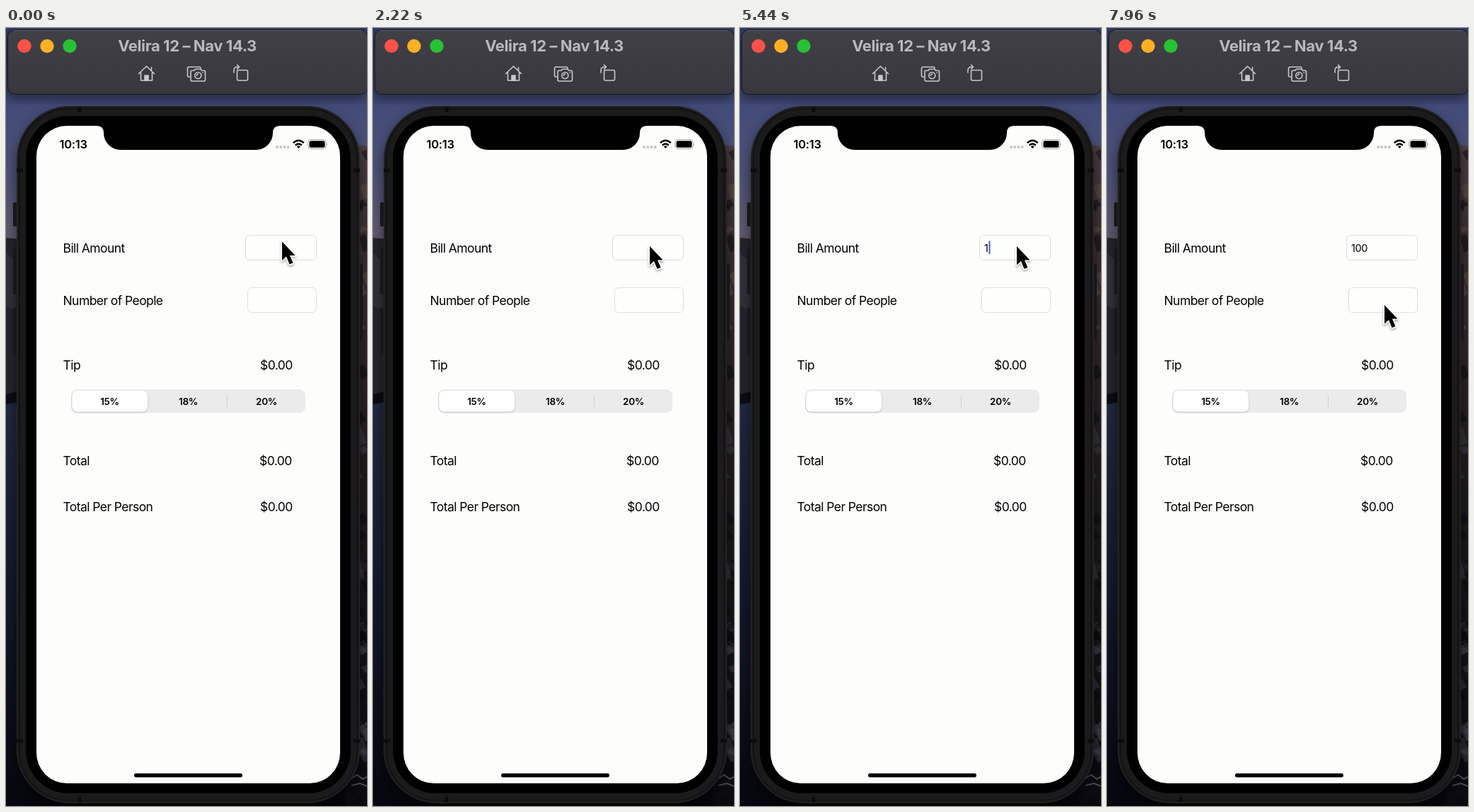
Recreate the animation shown at these times as an HTML page. Size 510 by 1098 pixels, loop 8 s.

```html
<!DOCTYPE html>
<html lang="en">
<head>
<meta charset="utf-8">
<title>Tip calculator</title>
<style>
  html, body { margin: 0; width: 100%; height: 100%; overflow: hidden; background: #11131f; }
  svg { display: block; width: 510px; height: 1098px; }
  text { font-family: Inter, "Open Sans", sans-serif; white-space: pre; }
  .label { font-size: 17.5px; letter-spacing: -.57px; }
  .choice { font-size: 13.5px; font-weight: 600; letter-spacing: -.35px; text-anchor: middle; }
  .icon { fill: none; stroke: #c9c8ce; stroke-width: 1.6; stroke-linejoin: round; stroke-linecap: round; }
  .field { fill: #fefefd; stroke: #dedee0; }
</style>
</head>
<body>
<svg viewBox="0 0 510 1098">
  <defs>
    <linearGradient id="sky" x2="0" y2="1">
      <stop offset="0" stop-color="#303866"/>
      <stop offset=".1" stop-color="#414b78"/>
      <stop offset=".2" stop-color="#515477"/>
      <stop offset=".27" stop-color="#625a70"/>
    </linearGradient>
    <linearGradient id="sea" x2="0" y2="1">
      <stop offset="0" stop-color="#202a42"/>
      <stop offset=".45" stop-color="#141a2e"/>
      <stop offset="1" stop-color="#06070e"/>
    </linearGradient>
    <linearGradient id="cliff" x2="0" y2="1">
      <stop offset="0" stop-color="#4c3d42"/>
      <stop offset=".2" stop-color="#362b2d"/>
      <stop offset=".5" stop-color="#201b20"/>
      <stop offset="1" stop-color="#0b0b10"/>
    </linearGradient>
    <linearGradient id="bar" x2="0" y2="1">
      <stop offset="0" stop-color="#414047"/>
      <stop offset="1" stop-color="#38373e"/>
    </linearGradient>
    <filter id="blur"><feGaussianBlur stdDeviation="9"/></filter>
    <filter id="soft" x="-50%" y="-50%" width="200%" height="200%">
      <feDropShadow dx="0" dy="2" stdDeviation="1.5" flood-opacity=".35"/>
    </filter>
    <filter id="lift" x="-10%" y="-20%" width="120%" height="150%">
      <feDropShadow dx="0" dy="1" stdDeviation="1.2" flood-color="#334" flood-opacity=".3"/>
    </filter>
  </defs>

  <!-- Coastal wallpaper -->
  <rect width="510" height="1098" fill="url(#sky)"/>
  <path d="M0 296L30 299V530H0Z" fill="#26242e"/>
  <path d="M0 318L14 330V400L0 392Z" fill="#33303a"/>
  <rect y="526" width="510" height="572" fill="url(#sea)"/>
  <path d="M0 517L16 513V528L0 531Z" fill="#0b0c14"/>
  <path d="M480 168L498 165 510 167V1098H480Z" fill="url(#cliff)"/>
  <g id="rocks"></g>
  <rect x="14" y="118" width="486" height="990" rx="78" opacity=".5" filter="url(#blur)"/>
  <rect x="0" y="12" width="510" height="87" rx="10" opacity=".5" filter="url(#blur)"/>

  <!-- Simulator toolbar -->
  <rect x="2.5" y="2.5" width="508" height="91" rx="10" fill="url(#bar)" stroke="#17171f"/>
  <path d="M11 3.5H502" stroke="#66656d"/>
  <circle cx="26" cy="25.5" r="9.7" fill="#fc5148"/>
  <circle cx="58" cy="25.5" r="9.7" fill="#fdb024"/>
  <circle cx="90" cy="25.5" r="9.7" fill="#27c136"/>
  <text x="256" y="32.5" text-anchor="middle" font-size="22" font-weight="700" letter-spacing="-.4" fill="#b9b8bf">Velira 12 – Nav 14.3</text>
  <g class="icon">
    <path d="M187.500 64.500L198.500 54 209.500 64.500M190.500 62.500V74H206.500V62.500M205.500 60V55.500"/>
    <path d="M196 74V67H201V74Z" fill="#c9c8ce"/>
    <path d="M260 69H258.500Q256.500 69 256.500 67V57Q256.500 55 258.500 55H273Q275 55 275 57"/>
    <path d="M263 60H266L267.500 58H275L276.500 60H279.500Q281.500 60 281.500 62V73Q281.500 75 279.500 75H263Q261 75 261 73V62Q261 60 263 60Z"/>
    <circle cx="271.300" cy="67" r="4.500"/><path d="M269.500 67a2 2 0 0 1 2-2M278 63h.5"/>
    <rect x="326.500" y="59.500" width="15" height="14.500" rx="2"/>
    <path d="M322 63V60Q322 55 327 55H329.500M326.500 52L329.500 55 326.500 58"/>
  </g>

  <!-- Phone body -->
  <g fill="#17171a">
    <rect x="10" y="246" width="8" height="34" rx="2"/>
    <rect x="10" y="311" width="8" height="65" rx="2"/>
    <rect x="10" y="395" width="8" height="65" rx="2"/>
    <rect x="496" y="333" width="8" height="107" rx="2"/>
  </g>
  <rect x="15.500" y="110.500" width="484" height="983" rx="74" fill="#1b1b1c" stroke="#28282a"/>
  <rect x="19" y="114" width="477" height="976" rx="70" fill="none" stroke="#111112" stroke-width="1.500"/>
  <path d="M15 201h9M15 1006h9M491 201h9M491 1006h9M104 111v8M104 1085v8" stroke="#0c0c0d" stroke-width="5"/>
  <rect x="28" y="124" width="459" height="956" rx="60"/>
  <rect x="43" y="138" width="429" height="928" rx="43" fill="#fdfdfc"/>
  <path d="M128 137V138Q138 138 138 148A24 24 0 0 0 162 172H353A24 24 0 0 0 377 148Q377 138 387 138V137Z"/>
  <rect x="181" y="1052" width="153" height="5.500" rx="2.700"/>

  <!-- Status bar -->
  <text x="75.500" y="169.500" font-size="16.500" font-weight="600" letter-spacing="-.3">10:13</text>
  <path d="M383 168h16" stroke="#c6c6c8" stroke-width="4" stroke-linecap="round" stroke-dasharray="0 5.200"/>
  <g fill="none" stroke="#000" stroke-width="2.500">
    <path d="M405.800 162.200Q413.300 155.300 420.800 162.200M408.800 165.500Q413.300 161.400 417.800 165.500"/>
    <path d="M413.300 170L410.800 167.300Q413.300 165.300 415.800 167.300Z" fill="#000" stroke="none"/>
  </g>
  <rect x="426.700" y="157.500" width="25.500" height="13" rx="4" fill="none" stroke="#a5a5a7"/>
  <rect x="428.500" y="159.200" width="22" height="9.500" rx="2.500"/>
  <path d="M453.300 162q1.800 2 0 4z" fill="#a5a5a7"/>

  <!-- Form -->
  <g class="label">
    <text x="80.500" y="317">Bill Amount</text>
    <text x="80.500" y="390.500">Number of People</text>
    <text x="80.500" y="482">Tip</text>
    <text x="80.500" y="617">Total</text>
    <text x="80.500" y="682">Total Per Person</text>
    <text x="359" y="482">$0.00</text>
    <text x="358" y="617">$0.00</text>
    <text x="359" y="682">$0.00</text>
  </g>
  <rect class="field" x="338.500" y="292.500" width="100" height="35" rx="5.500"/>
  <rect class="field" x="341.500" y="366.500" width="97" height="35" rx="5.500"/>
  <rect x="92" y="510" width="331" height="33" rx="8.500" fill="#ebebec"/>
  <rect x="93.500" y="512" width="106.500" height="29.500" rx="7" fill="#fff" filter="url(#lift)"/>
  <path d="M312.500 518V536" stroke="#d2d2d5"/>
  <g class="choice">
    <text x="146.500" y="531.500">15%</text>
    <text x="257.500" y="531.500">18%</text>
    <text x="368" y="531.500">20%</text>
  </g>
  <text id="bill" x="345" y="315.500" font-size="14.500" letter-spacing="-.35"></text>
  <rect id="caret" y="300.500" width="2" height="19" rx="1" fill="#3b62d9"/>
  <path id="pointer" d="M0 0V26.500L6 21 10.500 32 15.500 30 11 19.500H18.500Z" stroke="#fff" stroke-width="3" paint-order="stroke" stroke-linejoin="round" filter="url(#soft)"/>
</svg>
<script>
const el = id => document.getElementById(id);
const LOOP = 8000, FOCUS = 2900, KEYS = [5300, 5750, 6200];
const CARET_X = [345.5, 351.5, 360.5, 369];

const ease = (t, start, length) => {
  const p = Math.min(1, Math.max(0, (t - start) / length));
  return p * p * (3 - 2 * p);
};

// Scattered rock faces along the right edge
let seed = 7;
const random = () => (seed = seed * 16807 % 2147483647) / 2147483647;
let rocks = '';
for (let i = 0; i < 44; i++) {
  const y = 175 + random() * 915, x = 496 + random() * 14, h = 5 + random() * 18;
  const fill = random() < .5 ? '#08080c' : y < 430 ? '#65504c' : '#44424a';
  rocks += `<path d="M${x - 7} ${y}l9-4 7 ${h}-10 5z" fill="${fill}" opacity=".5"/>`;
}
el('rocks').innerHTML = rocks + '<path d="M486 1060l10-6 8 6 6-3M488 1069l12-3 10 4" fill="none" stroke="#777b86" stroke-width="2" opacity=".6"/>';

function draw(now) {
  const t = now % LOOP;
  const typed = KEYS.filter(k => t >= k).length;
  const since = t - (typed ? KEYS[typed - 1] : FOCUS);
  el('bill').textContent = '100'.slice(0, typed);
  el('caret').setAttribute('x', CARET_X[typed]);
  el('caret').setAttribute('opacity', since >= 0 && since % 1000 < 550 ? 1 : 0);

  const settle = ease(t, 1000, 1000), leave = ease(t, 6260, 1200);
  const x = 390 + settle - Math.sin(Math.PI * leave) * 2.5 + leave;
  const y = 301.5 + 6.5 * settle + 83 * leave;
  el('pointer').setAttribute('transform', `translate(${x} ${y})`);
  requestAnimationFrame(draw);
}
requestAnimationFrame(draw);
</script>
</body>
</html>
```
